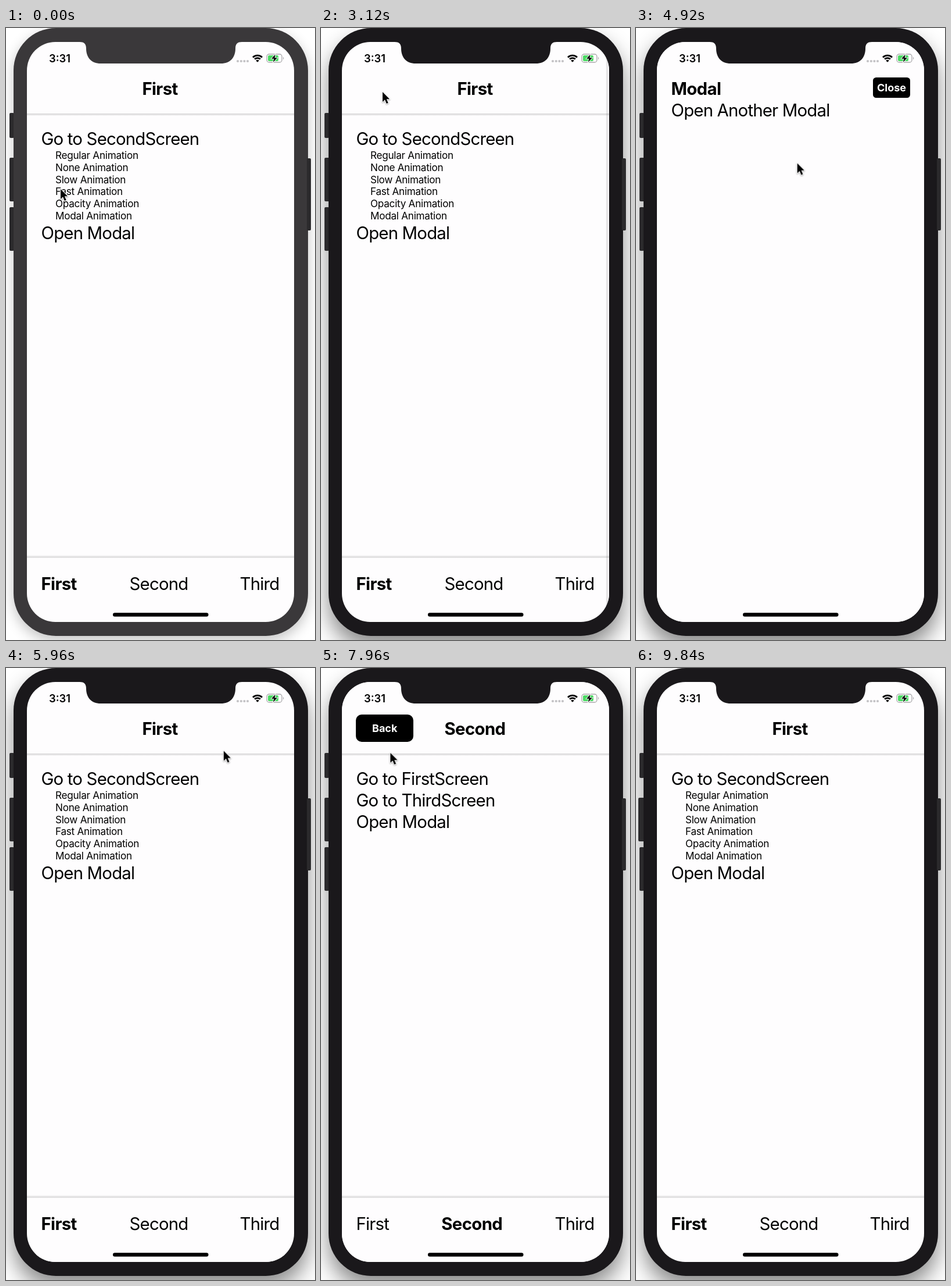
Write an HTML page that moves like this. It is 532 px wide and 1052 px high and loops after 10 s.

```html
<!DOCTYPE html>
<html lang="en">
<head>
<meta charset="utf-8">
<title>Screen transitions</title>
<style>
html, body { margin: 0; width: 100%; height: 100%; overflow: hidden; background: #fff; }
#stage { position: relative; width: 532px; height: 1052px; overflow: hidden; }
#case {
  position: absolute; left: 13px; top: 0; width: 507px; height: 1045px; border-radius: 73px;
  animation: focus 10s step-end infinite;
}
svg { position: absolute; left: 0; top: 0; }
text {
  font: 400 29.4px Inter, sans-serif; font-optical-sizing: none;
  letter-spacing: -.028em; fill: #000; white-space: pre;
}
.bold { font-weight: 700; letter-spacing: -.022em; }
.small text { font-size: 17.17px; letter-spacing: -.016em; }
.label { font-size: 18px; font-weight: 700; letter-spacing: 0; fill: #fff; }
.clock { font-size: 18.4px; font-weight: 600; letter-spacing: 0; }
.mid { text-anchor: middle; }
.end { text-anchor: end; }
.paper { fill: #fefdfe; }
.key { fill: #2b2a2c; }

.frame { animation: focusFill 10s step-end infinite; }
.volume { animation: hover 10s step-end infinite; }
.tab1 { animation: tab1 10s step-end infinite; }
.tab2 { animation: tab2 10s step-end infinite; }
.back { animation: press 10s step-end infinite; }
#second { animation: second 10s linear infinite; }
#modal { animation: modal 10s linear infinite; }
#cursor { animation: cursor 10s ease-in-out infinite; }

@keyframes focus {
  0% { background: #3a383a; box-shadow: 0 8px 22px rgba(0,0,0,.24); }
  8%, 100% { background: #1a181b; box-shadow: 0 20px 36px rgba(0,0,0,.46); }
}
@keyframes focusFill {
  0% { fill: #3a383a; }
  8%, 100% { fill: #1a181b; }
}
@keyframes hover {
  0% { transform: none; }
  95.2% { transform: translateX(-3px); }
  98.4%, 100% { transform: translateX(-2px); }
}
@keyframes tab1 {
  0%, 28.8%, 83.6%, 100% { visibility: visible; }
  10%, 69.3% { visibility: hidden; }
}
@keyframes tab2 {
  0%, 28.8%, 83.6%, 100% { visibility: hidden; }
  10%, 69.3% { visibility: visible; }
}
@keyframes press {
  0%, 85.2%, 100% { opacity: 1; }
  83.6% { opacity: .85; }
}
@keyframes second {
  0% { transform: translateX(470px); opacity: 1; }
  9.74% { transform: translateX(470px); opacity: 1; }
  9.75% { transform: translateX(460px); animation-timing-function: cubic-bezier(.22,.61,.36,1); }
  12.4% { transform: none; }
  28.6% { transform: none; animation-timing-function: cubic-bezier(.22,.61,.36,1); }
  31.2%, 43.7% { transform: translateX(457.5px); opacity: 1; }
  43.71% { transform: none; opacity: 0; }
  70.8% { opacity: 0; animation-timing-function: ease-in-out; }
  75.8% { opacity: 1; }
  85.1% { opacity: 1; animation-timing-function: ease-in-out; }
  90.1%, 100% { transform: none; opacity: 0; }
}
@keyframes modal {
  0% { transform: translateY(1000px); }
  43.4% { transform: translateY(1000px); animation-timing-function: cubic-bezier(.22,.61,.36,1); }
  48.2% { transform: none; }
  55.8% { transform: none; animation-timing-function: cubic-bezier(.22,.61,.36,1); }
  60.6%, 100% { transform: translateY(1000px); }
}
@keyframes cursor {
  0% { transform: translate(94px,277px); }
  5.2%, 16.2% { transform: translate(115px,280px); }
  21.2%, 22.6% { transform: translate(143px,230px); }
  26.4%, 33.4% { transform: translate(106px,110px); }
  41.2% { transform: translate(155px,370px); }
  45.2% { transform: translate(155px,370px); animation-timing-function: ease-in; }
  49.2% { transform: translate(277px,233px); animation-timing-function: ease-out; }
  53.6% { transform: translate(440px,109px); }
  54.4%, 56.8% { transform: translate(430px,104px); }
  66% { transform: translate(146px,302px); }
  70%, 74% { transform: translate(147px,306px); animation-timing-function: ease-in; }
  76.4% { transform: translate(146px,291px); animation-timing-function: ease-out; }
  82% { transform: translate(111px,100px); }
  84.8% { transform: translate(111px,100px); animation-timing-function: ease-in; }
  88.4% { transform: translate(94px,197px); animation-timing-function: ease-out; }
  92.7% { transform: translate(3px,285px); opacity: 1; }
  92.71%, 100% { transform: translate(-40px,285px); opacity: 0; }
}
</style>
</head>
<body>
<div id="stage">
  <div id="case"></div>
  <svg width="532" height="1052" viewBox="0 0 532 1052">
    <defs>
      <clipPath id="glass"><rect x="36" y="24" width="460" height="997" rx="49"/></clipPath>
      <linearGradient id="edge"><stop stop-opacity="0"/><stop offset="1" stop-opacity=".2"/></linearGradient>
      <linearGradient id="under" x2="0" y2="1"><stop stop-opacity=".17"/><stop offset="1" stop-opacity="0"/></linearGradient>
      <linearGradient id="over" x2="0" y2="1"><stop stop-opacity="0"/><stop offset="1" stop-opacity=".17"/></linearGradient>
    </defs>

    <rect class="key" x="6" y="146" width="8" height="43" rx="2"/>
    <rect class="key volume" x="6" y="223" width="12" height="75" rx="2"/>
    <rect class="key" x="6" y="308" width="8" height="75" rx="2"/>
    <rect class="key" x="518" y="224" width="7" height="124" rx="2"/>
    <rect class="frame" x="13" y="120" width="20" height="280"/>

    <g clip-path="url(#glass)">
      <rect class="paper" x="36" y="24" width="460" height="997"/>

      <g id="first">
        <g class="bars">
          <rect x="36" y="147" width="460" height="4.5" fill="url(#under)"/>
          <rect x="36" y="906" width="460" height="4.5" fill="url(#over)"/>
          <g class="tab1">
            <text class="bold" x="60.5" y="965.5">First</text>
            <text class="mid" x="263" y="965.5">Second</text>
          </g>
          <g class="tab2">
            <text x="60.5" y="965.5">First</text>
            <text class="bold mid" x="259.7" y="965.5">Second</text>
          </g>
          <text class="end" x="470.5" y="965.5">Third</text>
        </g>
        <text class="bold mid" x="265" y="115">First</text>
        <text x="60.5" y="201">Go to SecondScreen</text>
        <g class="small">
          <text x="85" y="224.7">Regular Animation</text>
          <text x="85" y="245.6">None Animation</text>
          <text x="85" y="266.5">Slow Animation</text>
          <text x="85" y="287.4">Fast Animation</text>
          <text x="85" y="308.3">Opacity Animation</text>
          <text x="85" y="329.2">Modal Animation</text>
        </g>
        <text x="60.5" y="363">Open Modal</text>
      </g>

      <g id="second">
        <rect x="33" y="24" width="3" height="997" fill="url(#edge)"/>
        <rect class="paper" x="36" y="24" width="460" height="997"/>
        <g class="back">
          <rect x="60" y="80" width="99" height="47" rx="10"/>
          <text class="label mid" x="109.7" y="110">Back</text>
        </g>
        <text class="bold mid" x="265" y="115">Second</text>
        <text x="60.5" y="201">Go to FirstScreen</text>
        <text x="60.5" y="238">Go to ThirdScreen</text>
        <text x="60.5" y="275">Open Modal</text>
      </g>

      <g id="modal">
        <rect class="paper" x="36" y="24" width="460" height="997"/>
        <text class="bold" x="60.5" y="115">Modal</text>
        <text x="60.5" y="152">Open Another Modal</text>
        <rect x="408" y="85" width="64" height="35" rx="5.5"/>
        <text class="label mid" x="440" y="109">Close</text>
      </g>
    </g>

    <path class="frame" d="M127 23V24C134 24 138 27 138 35C138 51 147 61 163 61H370C386 61 395 51 395 35C395 27 399 24 406 24V23Z"/>
    <text class="clock" x="74" y="58.5">3:31</text>
    <g fill="#c3c2c5">
      <circle cx="399" cy="57" r="2.1"/><circle cx="404.8" cy="57" r="2.1"/>
      <circle cx="410.4" cy="57" r="2.1"/><circle cx="416" cy="57" r="2.1"/>
    </g>
    <g fill="none" stroke="#000" stroke-width="2.8">
      <path d="M425 50.5A11.3 11.3 0 0 1 441 50.5"/>
      <path d="M428.1 53.6A6.9 6.9 0 0 1 437.9 53.6"/>
    </g>
    <path d="M433 58.8L430.2 56A4 4 0 0 1 435.8 56Z"/>
    <rect x="449" y="45" width="26" height="14" rx="4" fill="none" stroke="#a9a8ab" stroke-width="1.3"/>
    <path d="M477 49.5Q479.6 52 477 54.5Z" fill="#a9a8ab"/>
    <rect x="451" y="47" width="18" height="10" rx="2" fill="#4cd964"/>
    <path d="M463.5 45.5L457 52.7H461.2L460 58.7L467 51.3H462.6Z" stroke="#fefdfe" stroke-width="1.6" paint-order="stroke"/>
    <rect x="184" y="1005.2" width="164.5" height="6.6" rx="3.3"/>

    <g id="cursor">
      <path d="M0 0V17L4 13.3L6.8 19.9L9.7 18.7L6.9 12.2H12.2Z" stroke="#fff" stroke-width="2.2"
        stroke-linejoin="round" paint-order="stroke" style="filter:drop-shadow(0 1.5px 1.2px rgba(0,0,0,.35))"/>
    </g>
  </svg>
</div>
<script>
// Both pages carry the same bars, and both follow the active tab.
document.querySelector('#second .paper').after(document.querySelector('.bars').cloneNode(true));
</script>
</body>
</html>
```
